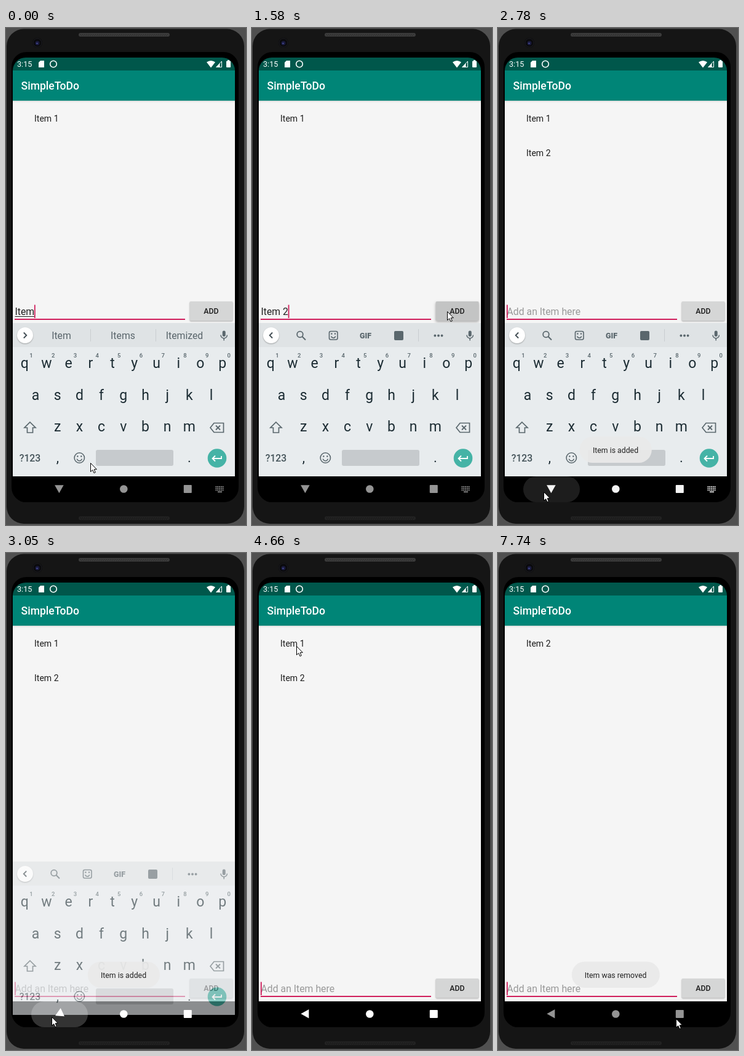
An HTML page with a canvas that plays this animation: 390x807 px, repeating every 8 s.

```html
<!DOCTYPE html>
<html lang="en">
<head>
<meta charset="utf-8">
<title>SimpleToDo</title>
<style>
html, body { margin: 0; width: 100%; height: 100%; overflow: hidden; background: #000; }
canvas { display: block; width: 390px; height: 807px; }
</style>
</head>
<body>
<canvas id="stage"></canvas>
<script>
const W = 390, H = 807, LOOP = 8000, TAU = Math.PI * 2;
const dpr = window.devicePixelRatio || 1;
const PINK = '#d01f5c', ICON = '#5a676d', KEY = '#1c2c33', INK = '#1c1c1c';
const ADDED = 1730, CLOSED = 3050, REMOVED = 6540, BLINK = 976;

function makeContext(canvas) {
  canvas.width = W * dpr;
  canvas.height = H * dpr;
  const g = canvas.getContext('2d');
  g.scale(dpr, dpr);
  return g;
}
const main = makeContext(document.getElementById('stage'));
const layer = makeContext(document.createElement('canvas'));
let c = main;

// Pointer moves: start, end, target x, target y.
const MOVES = [
  [760, 1060, 287, 467], [1170, 1300, 317, 460], [1730, 2090, 55, 721], [2200, 2360, 74, 753],
  [3320, 3860, 72, 151], [7070, 7400, 347, 650], [7400, 7740, 289, 756]
];

const ramp = (t, a, b) => Math.min(1, Math.max(0, (t - a) / (b - a)));
const easeOut = p => 1 - (1 - p) ** 2;
const easeInOut = p => p * p * (3 - 2 * p);
const fade = (t, a, b, from, to) => easeOut(ramp(t, a, b)) * (1 - ramp(t, from, to));

function pointerAt(t) {
  let x = 137, y = 706;
  for (const [a, b, tx, ty] of MOVES) {
    const p = easeOut(ramp(t, a, b));
    x += (tx - x) * p;
    y += (ty - y) * p;
  }
  return [Math.round(x), Math.round(y)];
}

function rect(x, y, w, h, color) {
  c.fillStyle = color;
  c.fillRect(x, y, w, h);
}
function round(x, y, w, h, r, color) {
  c.beginPath();
  c.roundRect(x, y, w, h, r);
  c.fillStyle = color;
  c.fill();
}
function disc(x, y, r, color) {
  c.beginPath();
  c.arc(x, y, r, 0, TAU);
  c.fillStyle = color;
  c.fill();
}
function arc(x, y, r, color, width, from = 0, to = TAU) {
  c.beginPath();
  c.arc(x, y, r, from, to);
  c.strokeStyle = color;
  c.lineWidth = width;
  c.stroke();
}
function path(points, x = 0, y = 0, close = false) {
  c.beginPath();
  for (let i = 0; i < points.length; i += 2) c.lineTo(x + points[i], y + points[i + 1]);
  if (close) c.closePath();
}
function poly(points, color, x, y) {
  path(points, x, y, true);
  c.fillStyle = color;
  c.fill();
}
function line(points, color, width, x, y, close) {
  path(points, x, y, close);
  c.strokeStyle = color;
  c.lineWidth = width;
  c.stroke();
}
function text(s, x, y, size, color, align = 'left', weight = 400) {
  c.font = `${weight} ${size}px Roboto, sans-serif`;
  c.textAlign = align;
  c.fillStyle = color;
  c.fillText(s, x, y);
}
function faded(alpha, draw) {
  if (alpha <= 0) return;
  c.save();
  c.globalAlpha *= alpha;
  draw();
  c.restore();
}
function raised(depth, draw) {
  c.save();
  c.shadowColor = 'rgba(0,0,0,.3)';
  c.shadowBlur = depth * 2 * dpr;
  c.shadowOffsetY = depth * dpr;
  draw();
  c.restore();
}

function speaker(y, color, dot) {
  round(118, y, 148, 6, 3, color);
  for (let row = 0; row < 2; row++)
    for (let x = 121 + row; x < 263; x += 3) rect(x, y + 2 + row * 2, 1, 1, dot);
}

function drawPhone() {
  rect(0, 0, W, H, '#505050');
  round(1, 1.5, 386, 803.5, 28, '#151515');
  round(9, 39, 369, 731, 24, '#000');
  speaker(8, '#3b3b3b', '#222');
  speaker(793, '#222', '#0e0e0e');
  disc(51, 24, 8, '#0a0a0c');
  arc(51, 24, 7, '#1f1f24', 1);
  disc(51, 24.5, 3.5, '#191a3c');
  disc(50.5, 25, 1.3, '#44488f');
}

function drawStatus() {
  rect(11, 48, 361, 21, '#00574b');
  text('3:15', 18, 63, 12.6, '#fff');
  poly([3, 0, 9, 0, 9, 11, 0, 11, 0, 3], '#fff', 53, 53);
  arc(77, 58.5, 5.3, '#fff', 1.6);
  c.beginPath();
  c.moveTo(333, 64.5);
  c.lineTo(326, 55.5);
  c.quadraticCurveTo(333, 50.5, 340, 55.5);
  c.fillStyle = '#fff';
  c.fill();
  poly([0, 11, 6.5, 4, 6.5, 11], '#fff', 341, 53);
  line([.8, 10.5, 9.5, 1, 9.5, 10.5], '#fff', 1, 341, 53, true);
  round(358, 53.5, 7, 10.5, 1, '#fff');
  rect(360, 52, 3, 2, '#fff');
}

function drawInput(t, dy) {
  const count = Math.min(6, 4 + Math.floor(t / 120));
  const typed = t < ADDED ? 'Item 2'.slice(0, count) : '';
  const edited = t < ADDED ? (count - 4) * 120 : ADDED;
  const y = 466 + dy;
  text(typed || 'Add an Item here', 14.5, y, 15.8, typed ? '#212121' : '#999');
  const end = 14.5 + c.measureText(typed).width;
  if (typed === 'Item') rect(14.5, y + 2, end - 14.5, 1, '#212121');
  rect(14, 472 + dy, 277, 2, PINK);
  if ((t - edited) % BLINK < BLINK / 2) rect(typed ? end - .3 : 14, 449.5 + dy, 1.8, 21.5, PINK);

  const pressed = t >= 1580 && t < ADDED;
  raised(pressed ? 2 : 1, () => round(298.5, 444 + dy, 70, 31.5, 2, pressed ? '#c3c4c4' : '#d5d6d6'));
  text('ADD', 333.5, 464 + dy, 12.3, INK, 'center', 500);
}

function drawApp(t, dy) {
  rect(11, 118, 361, 610, '#f5f5f5');
  const shade = c.createLinearGradient(0, 118, 0, 121);
  shade.addColorStop(0, 'rgba(0,0,0,.12)');
  shade.addColorStop(1, 'rgba(0,0,0,0)');
  rect(11, 118, 361, 3, shade);
  drawStatus();
  rect(11, 69, 361, 49, '#008577');
  text('SimpleToDo', 24.6, 100, 17.56, '#fff', 'left', 500);
  if (t < REMOVED) text('Item 1', 46, 152, 14.05, INK);
  const rise = 56 * easeInOut(ramp(t, REMOVED + 90, REMOVED + 240));
  if (t > ADDED + 120) text('Item 2', 46, 208 - rise, 14.05, INK);
  drawInput(t, dy);
}

function face(x, y, eye, mouth) {
  for (const side of [-1, 1]) disc(x + side * eye, y - 2.5, 1.2, ICON);
  arc(x, y + .6, mouth, ICON, 1.6, .25, Math.PI - .25);
}

function drawTools() {
  arc(78, 497.5, 4.8, ICON, 1.8);
  line([81.5, 501, 87, 506.5], ICON, 2);
  c.beginPath();
  c.roundRect(125.5, 492.5, 13.5, 13.5, 2.5);
  c.strokeStyle = ICON;
  c.lineWidth = 1.6;
  c.stroke();
  face(132.2, 499, 2.8, 3.6);
  text('GIF', 184.5, 503.5, 12.4, ICON, 'center', 900);
  round(231, 492, 15, 15, 2, ICON);
  rect(270, 489, 1, 20, '#c9cdd0');
  for (let i = -1; i < 2; i++) disc(303 + i * 5.6, 499.5, 1.9, ICON);
}

function drawStrip(mix) {
  rect(11, 479, 361, 39, '#dfe3e5');
  raised(1, () => disc(31, 499, 13, '#fff'));
  const dir = mix < 1 ? 1 : -1;
  line([-2.2 * dir, -4.5, 2.3 * dir, 0, -2.2 * dir, 4.5], '#3f4b51', 1.8, 31, 499);
  faded(1 - mix, () => {
    ['Item', 'Items', 'Itemized'].forEach((s, i) => {
      text(s, 90 + i * 100, 505, 15.8, '#59656b', 'center');
      if (i) rect(31 + i * 106, 489, 1, 20, '#c9cdd0');
    });
  });
  faded(mix, drawTools);
  round(351.7, 491.5, 5, 9.5, 2.5, ICON);
  arc(354.2, 498.5, 5.2, ICON, 1.5, 0, Math.PI);
  rect(353.4, 503.5, 1.6, 4, ICON);
}

function drawKeys() {
  rect(11, 518, 361, 210, '#e8ecee');
  const row = (letters, x, y, size = 23, color = KEY, weight = 400) =>
    [...letters].forEach((s, i) => text(s, x + i * 35.7, y, size, color, 'center', weight));
  row('qwertyuiop', 30.3, 552);
  row('asdfghjkl', 48, 604);
  row('zxcvbnm', 83.7, 655);
  row('1234567890', 41, 535, 9.5, '#56646a', 500);

  line([0, -9, 9, 0, 4.5, 0, 4.5, 8, -4.5, 8, -4.5, 0, -9, 0], ICON, 1.7, 39, 649, true);
  line([-11, 0, -5, -7.5, 10.5, -7.5, 10.5, 7.5, -5, 7.5], ICON, 1.7, 343, 649, true);
  for (const side of [-1, 1]) line([-2, -3.5 * side, 5, 3.5 * side], ICON, 1.8, 343, 649);

  text('?123', 39, 704, 15.8, '#45545a', 'center', 500);
  text(',', 84, 705, 22, KEY, 'center');
  text('.', 298, 705, 22, KEY, 'center');
  arc(119.3, 698, 8.2, ICON, 1.6);
  face(119.3, 698, 3, 4.2);
  round(146, 685, 126, 26, 3, '#c6cacd');
  disc(343, 698.5, 15.3, '#45b3a6');
  line([7, -4, 7, 0, -7, 0], '#fff', 1.8, 343, 699);
  line([-3, -4.5, -7.5, 0, -3, 4.5], '#fff', 1.8, 343, 699);
}

function drawKeyboard(t) {
  if (t > CLOSED + 120) return;
  const closing = t >= CLOSED;
  c = layer;
  c.clearRect(0, 0, W, H);
  drawStrip(ramp(t, 120, 360));
  drawKeys();
  c = main;
  faded(closing ? .6 : 1, () => c.drawImage(layer.canvas, 0, closing ? 22 : 0, W, H));
}

function drawNav(t) {
  const tone = 148 + 107 * fade(t, 2740, 2800, 5100, 5990);
  const color = `rgb(${tone},${tone},${tone})`;
  faded(.2 * fade(t, 2720, 2900, CLOSED, 3320), () => round(41, 728, 92, 42, 21, '#fff'));
  c.save();
  c.translate(86.4, 748.2);
  c.rotate(ramp(t, 2950, 3090) * Math.PI / 2);
  poly([-7.3, -6, 7.3, -6, 0, 7], color);
  c.restore();
  disc(191.3, 748.5, 6.3, color);
  round(288.8, 742, 13, 13, 1, color);
  if (t >= CLOSED) return;
  for (let i = 0; i < 15; i++)
    rect(340.5 + i % 5 * 2.8, 744 + Math.floor(i / 5) * 2.8, 1.8, 1.8, color);
  rect(344, 752.5, 7, 1.6, color);
}

function drawToast(message, half, alpha) {
  faded(alpha ** 2, () => round(191.3 - half, 663.5, half * 2, 42.5, 21, 'rgba(234,234,234,.93)'));
  faded(alpha, () => text(message, 191, 690, 12.3, '#222', 'center'));
}

function drawPointer(t) {
  const [x, y] = pointerAt(t);
  const arrow = [.5, .5, .5, 14.5, 3.7, 11.6, 6, 16.6, 8.3, 15.6, 6.1, 10.8, 10.3, 10.6];
  poly(arrow, '#fff', x, y);
  line(arrow, '#000', 1, x, y, true);
}

function draw(t) {
  drawPhone();
  c.save();
  c.beginPath();
  c.roundRect(11, 48, 361, 722, 21);
  c.clip();
  drawApp(t, t < CLOSED ? 0 : 247);
  rect(11, 728, 361, 42, '#000');
  drawKeyboard(t);
  drawNav(t);
  drawToast('Item is added', 58.5, fade(t, 1850, 2300, 3600, 4130));
  drawToast('Item was removed', 71.5, fade(t, 6470, 6850, LOOP, LOOP + 1));
  c.restore();
  drawPointer(t);
}

const start = performance.now();
function tick() {
  draw((performance.now() - start) % LOOP);
  requestAnimationFrame(tick);
}
tick();
</script>
</body>
</html>
```
